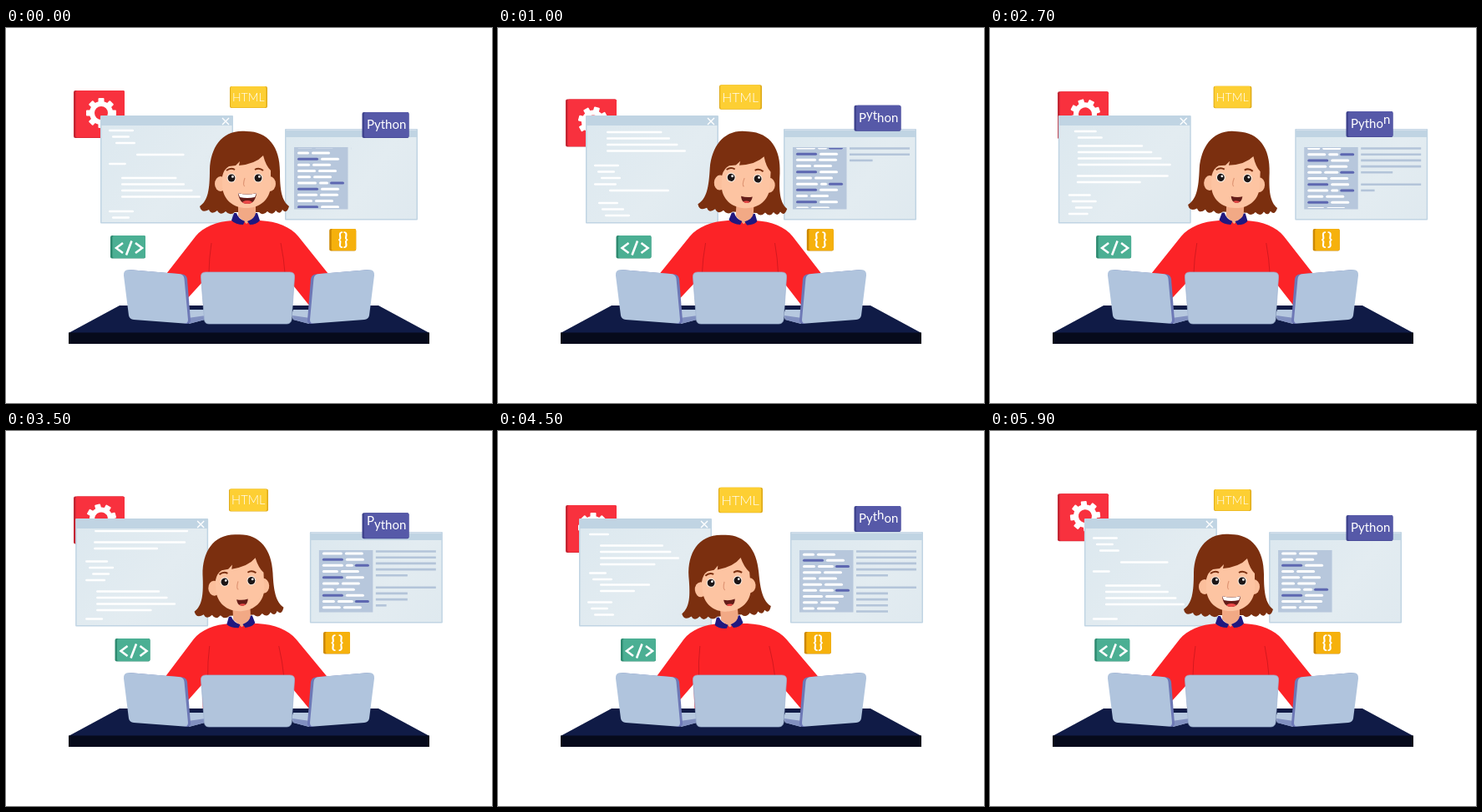
Write an HTML page with a canvas that moves like this. It is 582x450 px and loops after 6 s.

```html
<!DOCTYPE html>
<html lang="en">
<head>
<meta charset="utf-8">
<style>
html, body { margin: 0; width: 100%; height: 100%; overflow: hidden; background: #fff; }
canvas { display: block; }
</style>
</head>
<body>
<canvas id="stage" width="582" height="450"></canvas>
<script>
const ctx = document.getElementById('stage').getContext('2d');
const LOOP = 6000, TAU = Math.PI * 2;
const wave = (t, period) => Math.cos(TAU * t / period);
const clamp = v => Math.max(0, Math.min(1, v));
const ease = v => { v = clamp(v); return v * v * (3 - 2 * v); };

function shape(d, fill, stroke, width = 1) {
  const path = new Path2D(d);
  if (fill) { ctx.fillStyle = fill; ctx.fill(path); }
  if (stroke) { ctx.strokeStyle = stroke; ctx.lineWidth = width; ctx.stroke(path); }
}
function box(x, y, w, h, fill, r = 0) {
  ctx.fillStyle = fill;
  ctx.beginPath();
  ctx.roundRect(x, y, w, h, r);
  ctx.fill();
}
function oval(x, y, rx, ry, fill) {
  ctx.fillStyle = fill;
  ctx.beginPath();
  ctx.ellipse(x, y, rx, ry, 0, 0, TAU);
  ctx.fill();
}
function group(draw) { ctx.save(); draw(); ctx.restore(); }
function card(x, y, w, h, face, edge) {
  box(x, y, w, h, edge, 2);
  box(x + 2.5, y, w - 2.5, h - 0.5, face, 2);
}
function label(text, x, y, size, align = 'left', weight = 400) {
  ctx.font = `${weight} ${size}px Lato, sans-serif`;
  ctx.textAlign = align;
  ctx.fillStyle = '#fff';
  ctx.fillText(text, x, y);
}

function gearCard(t) {
  const y = 82 - 7 * wave(t, 3000);
  card(81, y, 61, 57, '#f8313e', '#c42533');
  group(() => {
    ctx.translate(114, y + 27);
    ctx.rotate(TAU * t / LOOP);
    for (let i = 0; i < 8; i++) {
      box(-3.5, -18, 7, 8, '#fff', 1);
      ctx.rotate(TAU / 8);
    }
    ctx.strokeStyle = '#fff';
    ctx.lineWidth = 6;
    ctx.beginPath();
    ctx.arc(0, 0, 11, 0, TAU);
    ctx.stroke();
  });
}

function htmlCard(t) {
  const size = 1.09 - 0.09 * wave(t, 3000);
  const count = t < 1500 ? 4 : Math.floor(clamp((t - 1850) / 600) * 4);
  group(() => {
    ctx.translate(290.5, 83);
    ctx.scale(size, size);
    box(-22.5, -13, 45, 26, '#dfac1c', 2);
    box(-21.5, -13, 42.5, 25.5, '#fdcf33', 2);
    label('HTML'.slice(0, count), -19.5, 5, 14, 'left', 300);
  });
}

function pythonCard(t) {
  const y = 95.5 + 5.5 * wave(t, 3000);
  card(426.5, y, 56, 31, '#5659a8', '#3f438e');
  let x = 432;
  [...'Python'].forEach((letter, i) => {
    const d = Math.abs(t % 3000 - 360 - 440 * i);
    const lift = d < 390 ? 7 * Math.cos(Math.PI / 2 * d / 390) ** 2 : 0;
    label(letter, x, y + 20 - lift, 15);
    x += ctx.measureText(letter).width;
  });
}

function tagCards(t) {
  const x = 136 - 11 * wave(t, 3000);
  card(x, 249, 42, 27.5, '#4baf93', '#2e8a70');
  group(() => {
    ctx.translate(x + 22, 264);
    shape('M-7-6L-15 0L-7 6M8-6L16 0L8 6M3.5-8.5L-3 8.5', null, '#fff', 2.6);
  });
  const bx = 366.5 + 10.5 * (1 + wave(t + 110, 3000));
  const gap = 1 - wave(t, 1500);
  card(bx, 241, 32, 26.5, '#f6b10c', '#cc8800');
  label('{', bx + 16.5 - gap, 260, 20, 'right', 700);
  label('}', bx + 16.5 + gap, 260, 20, 'left', 700);
}

function frameWindow(x, y, h, bar) {
  const fill = ctx.createLinearGradient(x, y, x + 159, y + h);
  fill.addColorStop(0, '#dce8ef');
  fill.addColorStop(0.6, '#e3ecf1');
  fill.addColorStop(1, '#dfe9ef');
  box(x, y, 159, h, '#c0d4e3', 1);
  box(x + 1.5, y + bar, 156, h - bar - 1.5, fill);
}

// Runs of code lines: start, indent, width, number of lines.
const codeRuns = [
  [123, 10, 30, 3], [152, 43, 64, 1], [163, 10, 26, 1], [180, 25, 95, 4],
  [220, 10, 30, 4], [250, 28, 80, 1], [265, 15, 30, 3], [290, 23, 112, 4],
  [326, 22, 110, 2], [349, 12, 30, 4], [385, 25, 95, 4], [418, 12, 30, 2], [432, 25, 60, 2]
];
function editorWindow(t) {
  const x = 97 + 16 * wave(t, LOOP);
  frameWindow(x, 105, 129.5, 12);
  shape(`M${x + 146} 108l8 8m0-8l-8 8`, null, '#fff', 1.4);
  group(() => {
    ctx.beginPath();
    ctx.rect(x + 4, 119, 151, 111);
    ctx.clip();
    codeRuns.forEach(([start, indent, width, count], run) => {
      for (let i = 0; i < count; i++) {
        const y = (start + 7.5 * i - 0.055 * t - 110 + 660) % 330 + 110;
        const w = width * (1 - 0.3 * ((i * 3 + run) % 4) / 3);
        const shift = width < 40 ? i % 3 * 4 : 0;
        box(x + indent + shift, y - 1.2, w, 2.4, '#fff', 1.2);
      }
    });
  });
}

// Rows of the scrolling panel that carry a violet dash.
const leftAccents = [1, 6, 9, 12, 14, 17, 21, 24, 27];
const rightAccents = [5, 11, 16, 19, 22, 28, 32];
function outlineWindow(t) {
  const x = 350 - 16 * wave(t, LOOP);
  frameWindow(x, 121, 109.5, 10);
  box(x + 1.5, 121.5, 156, 1.5, '#d4e0eb');
  box(x + 11, 143, 64.5, 74.5, '#b7c7dc');
  group(() => {
    ctx.beginPath();
    ctx.rect(x + 11, 144, 64.5, 72);
    ctx.clip();
    for (let i = 0; i < 35; i++) {
      const y = (7.2 * i + 10 - 0.042 * t + 252) % 252 + 140;
      const left = leftAccents.includes(i), right = rightAccents.includes(i);
      const split = 14 + i * 7 % 13;
      box(x + 15, y - 1.5, left ? 25 : split, 3, left ? '#5d67b1' : '#fff', 1.5);
      box(x + (left ? 43 : 18 + split), y - 1.5, right ? 34 - split : 22, 3, '#fff', 1.5);
      if (right) box(x + 54, y - 1.5, 17, 3, '#5d67b1', 1.5);
    }
  });
  group(() => {
    ctx.globalAlpha = 1 - clamp((t - 5200) / 500);
    for (let i = 0; i < 10; i++) {
      const width = i < 4 || i == 5 ? 72 : 38;
      const y = 144.5 + 7.2 * (i + (i > 4));
      box(x + 79, y - 1.3, width * clamp(t / 420 - i), 2.6, '#b3c4d9');
    }
  });
}

function body(lean) {
  group(() => {
    ctx.transform(1, 0, -0.05 * lean, 1, 0.05 * lean * 345, 0);
    shape('M272 231C252 232 236 239 227 250L192 295L216 326L236 304V335H340V304L364 334L386 295L350 250C341 239 325 232 304 231Z', '#fc2327');
    shape('M246 258Q243 278 243 294M329 258Q333 278 334 294', null, '#c9171e', 0.8);
  });
}

function eye(x, open) {
  group(() => {
    ctx.translate(x, 180);
    ctx.scale(1, open);
    oval(0, 0, 5.4, 5.6, '#fff0e6');
    oval(0, 0, 4.4, 4.6, '#1b1516');
    oval(1.4, -1.6, 1.4, 1.4, '#fff');
  });
  if (open < 0.5) shape(`M${x - 5} 179q5-1 10 1`, null, '#2a1713', 2.2);
}

function head(t, lean) {
  const open = 1 - 0.85 * clamp(1.6 - Math.abs(t - 1800) / 125);
  const laugh = Math.max(1 - ease((t - 300) / 500), ease((t - 5300) / 400));
  group(() => {
    ctx.translate(288, 350);
    ctx.rotate(0.092 * lean);
    ctx.translate(-288, -350);
    shape('M288 124C260 121 245 142 244 170C244 194 242 207 232 214Q234 223 243 218Q246 225 253 219Q257 226 263 220Q268 226 274 221H303Q308 226 313 220Q319 226 323 219Q328 225 331 218Q336 224 339 214C330 207 328 194 328 172C328 143 314 124 288 124Z', '#7b2f0f');
    shape('M278 205H299V226L288 235L278 226Z', '#f2a985');
    oval(257, 187, 7, 9, '#fbbf9c');
    oval(316, 187, 7, 9, '#fbbf9c');
    shape('M259 178Q261 169 267 166L275 165L280 160L279 165Q299 163 308 153Q311 165 317 171V190C316 206 304 216 288 216C272 216 260 206 259 190Z', '#fdc4a2');
    shape('M264 171q5-4 10-1M298 170q5-3 10 1', null, '#7b2f0f', 2);
    eye(270, open);
    eye(302, open);
    shape('M286 180Q283 189 286 190', null, '#df9574', 1.2);
    group(() => {
      ctx.translate(289 + (1 - laugh), 200 + (1 - laugh) * 3);
      ctx.scale(0.62 + 0.38 * laugh, 0.6 + 0.4 * laugh);
      const mouth = 'M-11-2Q0 1 11-2C10 7 6 11 0 11S-10 7-11-2Z';
      shape(mouth, '#641d19');
      ctx.clip(new Path2D(mouth));
      oval(0, 11, 7, 4, '#ec4a49');
      ctx.globalAlpha = laugh;
      shape('M-11-2Q0 1 11-2L9 3Q0 5-9 3Z', '#fff');
    });
    shape('M273 222L270 231Q275 236 284 236L286 232Q278 229 276 222ZM301 222L304 231Q300 236 292 236L289 232Q298 229 299 222Z', '#20187f');
  });
}

function sideLaptop() {
  shape('M217 338L238 338Q241 345 238 350L219 355Z', '#b6c8df');
  shape('M218 348L239 345L238 350L219 355Z', '#8190c0');
  shape('M147 290L211 295.5Q216 296 217 301L221 351Q221 355 216 355L210 353Z', '#6d78b6');
  shape('M147 290L207 295Q213 295.5 213.5 301L218 350Q218 355 213 354.5L153 350Q148 349.5 147 345L141 297Q140.5 290 147 290Z', '#b0c4dd');
}

function desk() {
  shape('M136 333H446L507 366H75Z', '#101b46');
  box(75, 365.5, 432, 13.5, '#060a1b');
  sideLaptop();
  group(() => {
    ctx.translate(582, 0);
    ctx.scale(-1, 1);
    sideLaptop();
  });
  shape('M239 293H340Q346 293 345.5 299L342 350Q341 355 336 355H243Q238 355 237.5 350L233.5 299Q233 293 239 293Z', '#b1c4dc', '#9fb4d2', 0.7);
}

function leanAt(t) {
  if (t < 1800) return ease(t / 1800);
  if (t < 4300) return 1 - 2 * ease((t - 1800) / 2500);
  return ease((t - 4300) / 1600) - 1;
}

function draw(now) {
  const t = now % LOOP, lean = leanAt(t);
  box(0, 0, 582, 450, '#fff');
  gearCard(t);
  editorWindow(t);
  outlineWindow(t);
  htmlCard(t);
  pythonCard(t);
  tagCards(t);
  body(lean);
  head(t, lean);
  desk();
  requestAnimationFrame(() => draw(performance.now() - begin));
}
const begin = performance.now();
draw(0);
</script>
</body>
</html>
```
